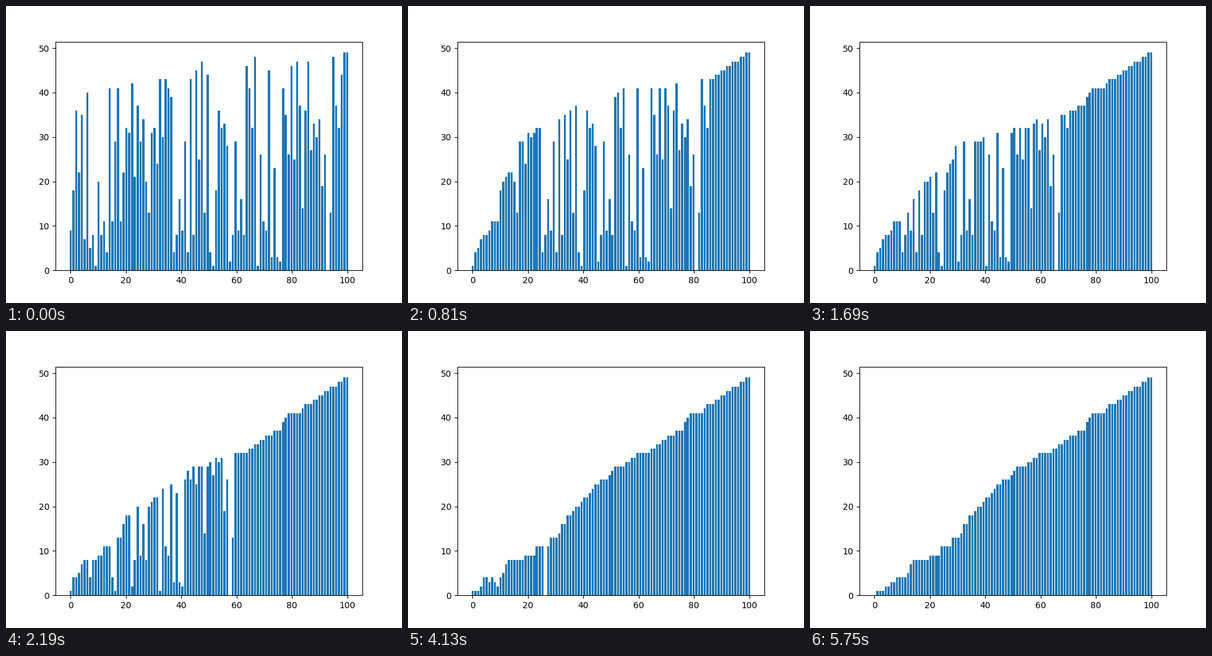
Animation, 640 px wide and 480 px high, one loop 6250 ms. Source, as a matplotlib script:

```python
import matplotlib.pyplot as plt
import numpy as np
from matplotlib.animation import FuncAnimation

FRAMES = 100
LOOP_MS = 6250

START = [
    9, 18, 36, 22, 35, 7, 40, 5, 8, 1,
    20, 8, 11, 4, 41, 11, 29, 41, 11, 22,
    32, 31, 42, 21, 37, 29, 34, 20, 13, 31,
    32, 24, 43, 30, 43, 41, 39, 4, 8, 16,
    9, 29, 4, 43, 8, 45, 25, 47, 13, 44,
    4, 1, 18, 36, 32, 33, 28, 2, 8, 29,
    9, 16, 8, 46, 41, 32, 48, 1, 26, 11,
    9, 45, 3, 23, 3, 2, 41, 35, 26, 46,
    25, 47, 37, 14, 36, 47, 27, 33, 30, 34,
    19, 26, 0, 13, 48, 37, 32, 44, 49, 49,
]


def bubble_pass(values):
    """Return the values after one left-to-right bubble sort pass."""
    out = list(values)
    for i in range(len(out) - 1):
        if out[i] > out[i + 1]:
            out[i], out[i + 1] = out[i + 1], out[i]
    return out


# One complete pass per frame
states = [START]
while len(states) < FRAMES:
    states.append(bubble_pass(states[-1]))

fig, ax = plt.subplots(figsize=(6.4, 4.8), dpi=100)
bars = ax.bar(np.linspace(0, 100, len(START)), START)


def draw(frame):
    for bar, height in zip(bars, states[frame]):
        bar.set_height(height)
    return bars.patches


anim = FuncAnimation(fig, draw, frames=FRAMES, interval=LOOP_MS / FRAMES,
                     repeat=True, repeat_delay=0)
plt.show()
```
